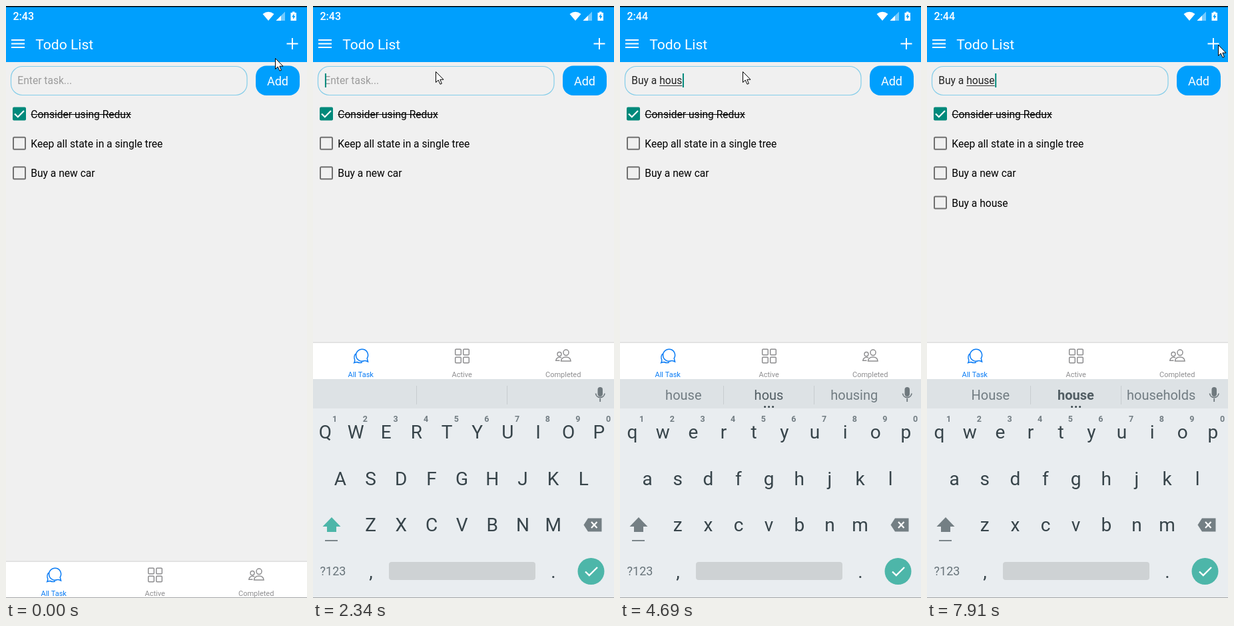
These frames come from a looping animation (452 by 887 pixels, 8 s). An HTML page with a canvas:

```html
<!DOCTYPE html>
<html lang="en">
<head>
<meta charset="utf-8">
<title>Todo List</title>
<style>
html, body { margin: 0; width: 100%; height: 100%; overflow: hidden; background: #f0f0f0; }
canvas { display: block; }
</style>
</head>
<body>
<canvas id="stage" width="452" height="887"></canvas>
<script>
const c = document.getElementById('stage').getContext('2d');
const LOOP = 8000;
const BLUE = '#009ffd', TEAL = '#00897b';
const KEYBOARD_IN = 2190, KEYBOARD_UP = 2340, ITEM_ADDED = 6230, MINUTE = 4550;

// [time, x, y]
const pointer = [
  [0, 404, 78], [1360, 338, 122], [1490, 254, 145], [1620, 194, 112], [1760, 184, 98],
  [5550, 215, 97], [5680, 300, 103], [5820, 385, 110], [5950, 404, 113],
  [6380, 402, 285], [6530, 248, 319], [6780, 228, 381], [6920, 232, 372],
  [7060, 250, 285], [7210, 277, 176], [7360, 360, 118], [7490, 420, 72], [7630, 437, 58]
];
// [time, committed text, word being typed, suggestions]
const typing = [
  [0, '', '', ['', '', '']],
  [2900, '', 'B', ['By', 'B', 'But']],
  [3170, '', 'Bu', ['But', 'Bu', 'By']],
  [3290, '', 'Buy', ['But', 'Buy', 'By']],
  [3560, 'Buy ', '', ['a', 'the', 'it']],
  [3700, 'Buy ', 'a', ['a', 'the', 'it']],
  [3840, 'Buy ', 'a', ['A', 'a', 'an']],
  [4140, 'Buy a ', 'h', ['he', 'h', 'her']],
  [4280, 'Buy a ', 'ho', ['how', 'ho', 'hot']],
  [4420, 'Buy a ', 'hou', ['house', 'hou', 'hour']],
  [4690, 'Buy a ', 'hous', ['house', 'hous', 'housing']],
  [4990, 'Buy a ', 'house', ['House', 'house', 'households']]
];
const caretOff = [[0, 2040], [2490, 2900], [5550, 5950], [6530, 6780], [7360, 7910]];

const at = (steps, t) => steps.filter(s => s[0] <= t).pop();

function text(str, x, y, size, color, align = 'left', weight = 400) {
  c.font = `${weight} ${size}px Roboto, sans-serif`;
  c.textAlign = align;
  c.fillStyle = color;
  c.fillText(str, x, y);
  return c.measureText(str).width;
}

function rect(x, y, w, h, color, r = 0) {
  c.fillStyle = color;
  c.beginPath();
  c.roundRect(x, y, w, h, r);
  c.fill();
}

function frame(x, y, w, h, color, width, r) {
  c.strokeStyle = color;
  c.lineWidth = width;
  c.beginPath();
  c.roundRect(x, y, w, h, r);
  c.stroke();
}

function fill(d, color) {
  c.fillStyle = color;
  c.fill(new Path2D(d));
}

function line(d, color, width) {
  c.strokeStyle = color;
  c.lineWidth = width;
  c.stroke(new Path2D(d));
}

function header(t) {
  rect(0, 0, 452, 84, BLUE);
  rect(0, 0, 452, 1.6, '#000');
  text(t < MINUTE ? '2:43' : '2:44', 10.5, 21, 16, '#fff', 'left', 500);
  fill('M385.5 12Q394 5.5 402.5 12L394 22Z', '#fff');
  fill('M419 8.5V22H405.5Z', 'rgba(255,255,255,.45)');
  fill('M413 14.5V22H405.5Z', '#fff');
  fill('M427.5 10H430V8.5H433.5V10H436V22H427.5Z', '#fff');
  fill('M432.5 11.5L429.2 16.5H431.2V20L434.5 15H432.5Z', BLUE);
  line('M8 51H28M8 56.5H28M8 62H28', '#fff', 2);
  line('M421.5 56.5H438.5M430 48V65', '#fff', 2);
  text('Todo List', 44.2, 64.5, 21.1, '#fff');
}

function input(t, done, word) {
  const left = 17.3, base = 117;
  frame(7.5, 90.5, 354.5, 43, '#84cde9', 1.2, 17);
  rect(375, 89.5, 66, 44.5, BLUE, 16);
  text('Add', 408, 119, 18, '#fff', 'center');
  let x = left;
  if (done + word) {
    x += text(done, x, base, 15.6, '#222');
    const w = text(word, x, base, 15.6, '#222');
    rect(x, 119, w, 1, '#333');
    x += w;
  } else {
    text('Enter task...', left, base, 15.6, '#9c9c9c');
  }
  if (!caretOff.some(([a, b]) => t >= a && t < b)) rect(x + .6, 101, 2, 21, TEAL);
}

function items(t) {
  const tasks = ['Consider using Redux', 'Keep all state in a single tree', 'Buy a new car'];
  if (t >= ITEM_ADDED) tasks.push('Buy a house');
  tasks.forEach((task, i) => {
    const y = 161.5 + i * 44.35;
    const w = text(task, 37.3, y + 6, 15.6, '#000');
    if (i) return frame(11, y - 9, 18, 18, '#717171', 2, 1.5);
    rect(10, y - 10, 20, 20, TEAL, 2);
    line('M13 161.5L17.8 166.2L27 157', '#fff', 2.2);
    rect(37.5, 162, w, 1, '#000');
  });
}

function tabs(y) {
  const gray = '#8e8e90', blue = '#0a7cf5';
  c.save();
  c.translate(0, y);
  rect(0, 0, 452, 887, '#fff');
  rect(0, -1, 452, 1.5, '#dedede');
  line('M81.2 23.5A9 9 0 1 0 76.5 27.2Q79 26.8 82.5 28.5Q81.8 25.5 81.2 23.5Z', blue, 1.5);
  line('M64 16.5Q60.5 21 62.8 26Q62.8 28 61.8 30Q64.5 29 66.5 29Q70 31 74 29.3', blue, 1.5);
  for (const [x, top] of [[213.7, 9.7], [225.7, 9.7], [213.7, 21.7], [225.7, 21.7]])
    frame(x, top, 8.6, 8.6, gray, 1.5, 1.2);
  line('M376 14.5a4 4 0 1 1 8 0a4 4.5 0 1 1 -8 0M372.5 27.5Q373 21.5 380 21.5Q386.5 21.5 387 27.5Z', gray, 1.5);
  line('M367 17a3 3 0 1 1 6 0a3 3.3 0 1 1 -6 0M373 22.3Q365.5 20.5 364.7 26.8H370.5', gray, 1.4);
  text('All Task', 71.7, 51.5, 11, blue, 'center');
  text('Active', 223.7, 51.5, 11, gray, 'center');
  text('Completed', 375.7, 51.5, 11, gray, 'center');
  c.restore();
}

function keyboard(t, typed, words) {
  const entering = t < KEYBOARD_UP;
  const ink = '#37444a', soft = '#717c82';
  c.save();
  if (entering) {
    c.translate(0, 11);
    c.globalAlpha = .86;
  }
  rect(0, 560, 452, 340, '#e9edf0');
  rect(0, 559, 452, 44, '#dde2e5');
  rect(155, 569, 1, 28, '#c8cdd0');
  rect(291, 569, 1, 28, '#c8cdd0');

  const composing = typed && words[1] !== 'the';
  const bold = composing && !['hous', 'h', 'ho', 'hou'].includes(words[1]);
  words.forEach((word, i) =>
    text(word, 95.3 + i * 128.2, 590, 20, i === 1 ? '#515d63' : soft, 'center', i === 1 && bold ? 700 : 400));
  if (composing) for (const x of [217.6, 223.6, 229.6]) rect(x - 1.5, 599, 3, 3, ink, 1.5);

  rect(427.5, 571, 7.5, 14, '#6f797e', 3.75);
  line('M424.5 580.5A6.8 6.8 0 0 0 438 580.5M431.2 588V593', '#6f797e', 1.8);

  ['qwertyuiop', 'asdfghjkl', 'zxcvbnm'].forEach((row, r) =>
    [...row].forEach((key, i) => {
      const x = [18.5, 41, 86.7][r] + i * 45.65;
      text(typed ? key : key.toUpperCase(), x, 648 + r * 69.7, 28, ink, 'center');
      if (!r) text((i + 1) % 10, 32.7 + i * 45.65, 623, 12.5, soft, 'center', 700);
    }));

  fill('M28 766L41.5 780H35V788H21V780H14.5Z', typed ? '#747f84' : '#4db6a9');
  rect(18, 800, 19, 2, '#7c868b');
  fill('M406.5 777.5L413 767.5H433.5V787.5H413Z', '#747f84');
  line('M418 773L426.5 782M426.5 773L418 782', '#fff', 2.2);
  text('?123', 30, 853, 18, '#68747a', 'center');
  text(',', 87, 857, 28, ink, 'center');
  text('.', 361, 857, 28, ink, 'center');
  rect(114, 833, 220, 27, '#ced2d4', 4);
  rect(397.5, 827, 40, 40, '#4db6a9', 20);
  line('M409 847.5L414.8 853L427 841', '#fff', 2.4);
  c.restore();
}

function arrow(x, y) {
  const d = 'M.5 .5V16.5L4.2 13L7 19.2L9.4 18.2L6.8 12.2H12Z';
  c.save();
  c.translate(x, y);
  fill(d, '#fff');
  line(d, '#000', 1);
  c.restore();
}

function draw(now) {
  const t = now % LOOP;
  const [, done, word, words] = at(typing, t);
  const open = t >= KEYBOARD_IN;
  rect(0, 0, 452, 887, '#f0f0f0');
  header(t);
  input(t, done, word);
  items(t);
  tabs(open ? 504.5 : 832.5);
  if (open) keyboard(t, done + word, words);
  rect(0, 886, 452, 1, '#a4a6a8');
  const [, x, y] = at(pointer, t);
  arrow(x, y);
}

const start = performance.now();
function tick() {
  draw(performance.now() - start);
  requestAnimationFrame(tick);
}
tick();
</script>
</body>
</html>
```
